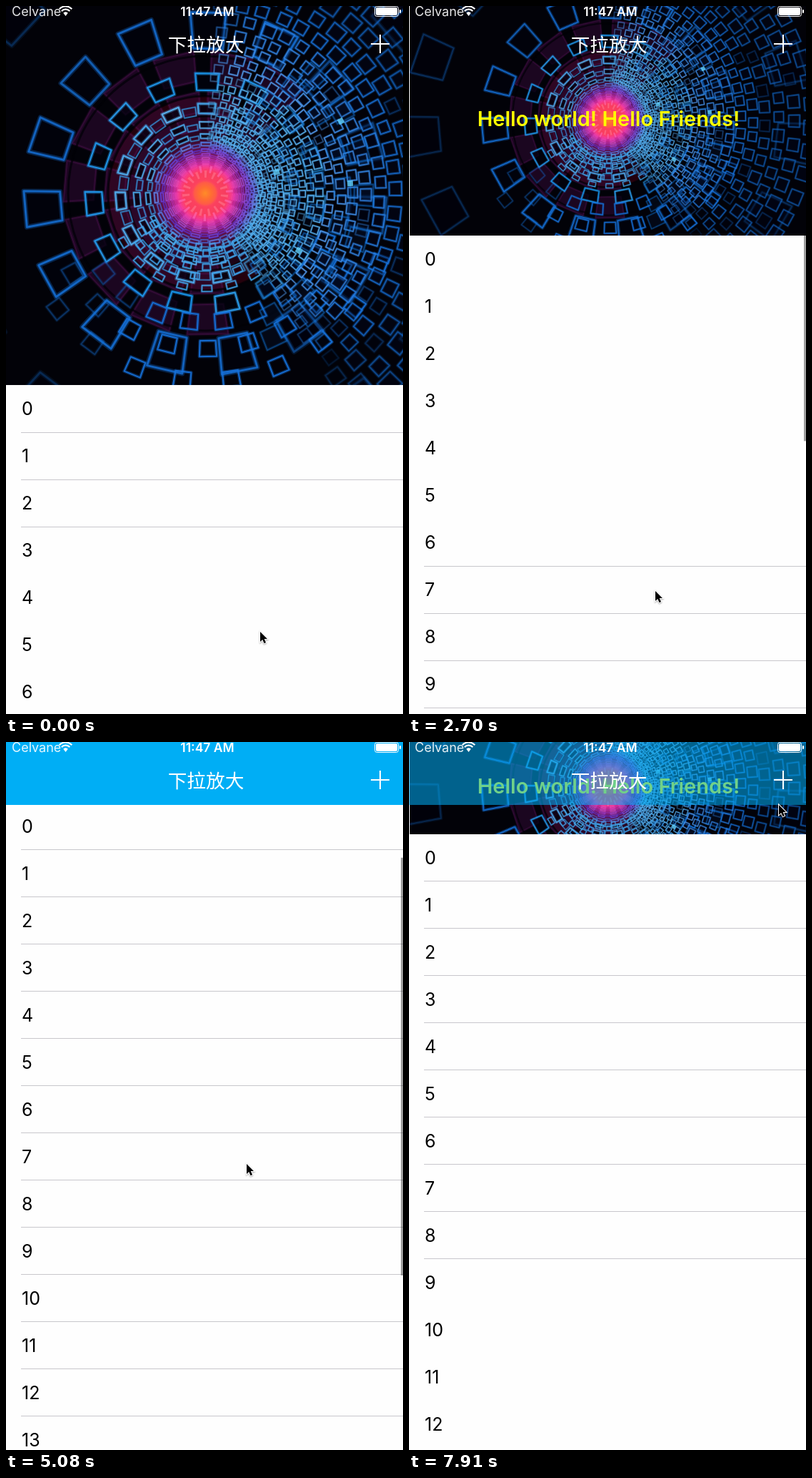
An HTML page with a canvas for the animation above (8 s loop, 556 px wide and 990 px high).

```html
<!DOCTYPE html>
<html lang="zh">
<head>
<meta charset="utf-8">
<style>
html, body { margin: 0; width: 100%; height: 100%; overflow: hidden; background: #fefefe; }
canvas { display: block; width: 556px; height: 990px; }
</style>
</head>
<body>
<canvas id="stage" width="556" height="990"></canvas>
<script>
const W = 556, H = 990, LOOP = 8000, ROW = 66, NAV = 88, REST = 366;
const ctx = document.getElementById('stage').getContext('2d');
const SANS = 'Inter, "Noto Sans", sans-serif';
const CJK = '"Noto Sans CJK SC", "Noto Sans CJK", "Noto Sans CJK JP", sans-serif';

// time, header height, pointer x, pointer y, first hidden separator
const KEYS = [
  [0, 530, 356, 875, 3], [150, 533, 355, 880, 3], [900, 533, 355, 880, 3],
  [1050, 500, 355, 881, 3], [1200, 410, 355, 881, -7], [1350, 374, 355, 881, -7],
  [1500, 366, 355, 881, -7], [1650, 366, 355, 881, -7], [1950, 366, 350, 868, -7],
  [2250, 366, 350, 863, -7], [2700, 321, 345, 818, -6], [3900, 117, 340, 615, 9],
  [4490, 92, 338, 596, 14], [5080, 85, 337, 590, 14], [6560, 145, 338, 642, -11],
  [7160, 129, 336, 626, 9], [7310, 129, 336, 626, 9], [7910, 129, 518, 88, 9]
];

const clamp = (v, a = 0, b = 1) => Math.min(b, Math.max(a, v));
const mix = (a, b, p) => a + (b - a) * p;

// The screen updates in uneven steps
const ticks = [0];
for (let n = 0; n < 53; n++) ticks.push(ticks[n] + ([29, 30, 34, 42].includes(n) ? 140 : 150));

function slope(i, c) {
  if (i < 1 || i >= KEYS.length - 1) return 0;
  const [p, k, n] = [KEYS[i - 1], KEYS[i], KEYS[i + 1]];
  const a = (k[c] - p[c]) / (k[0] - p[0]), b = (n[c] - k[c]) / (n[0] - k[0]);
  return a * b > 0 ? 2 * a * b / (a + b) : 0;
}

function track(t, c) {
  let i = 0;
  while (i < KEYS.length - 2 && t >= KEYS[i + 1][0]) i++;
  const a = KEYS[i], b = KEYS[i + 1], d = b[0] - a[0];
  const u = clamp((t - a[0]) / d), v = 1 - u;
  return a[c] * (1 + 2 * u) * v * v + slope(i, c) * d * u * v * v
       + b[c] * u * u * (3 - 2 * u) - slope(i + 1, c) * d * u * u * v;
}

function hidden(t) {
  let g = KEYS[0][4];
  for (const k of KEYS) if (t >= k[0]) g = k[4];
  return g;
}

// ---- tunnel picture, drawn once ----
const PW = 795, PH = 530, PX = 397, PY = 262;

function makeTunnel() {
  const cv = document.createElement('canvas');
  cv.width = PW; cv.height = PH;
  const g = cv.getContext('2d');
  let seed = 7;
  const rnd = () => (seed = (seed * 16807) % 2147483647) / 2147483647;
  const rad = d => d * Math.PI / 180;

  g.fillStyle = '#020208';
  g.fillRect(0, 0, PW, PH);
  g.translate(PX, PY);
  g.lineJoin = 'round';

  function disc(r, stops, from = 0, to = 360) {
    const gr = g.createRadialGradient(0, 0, 0, 0, 0, r);
    stops.forEach(([p, c]) => gr.addColorStop(p, c));
    g.fillStyle = gr;
    g.beginPath();
    g.moveTo(0, 0);
    g.arc(0, 0, r, rad(from), rad(to));
    g.fill();
  }

  function tile(deg, r, len, wid, style, lw, fill) {
    const a = r - len / 2, b = r + len / 2, p = wid / 2 * a / r, q = wid / 2 * b / r;
    g.save();
    g.rotate(rad(deg));
    g.beginPath();
    g.moveTo(a, -p); g.lineTo(b, -q); g.lineTo(b, q); g.lineTo(a, p);
    g.closePath();
    if (fill) { g.fillStyle = fill; g.fill(); }
    if (style) {
      const al = g.globalAlpha;
      g.strokeStyle = style;
      g.globalAlpha = al * .35;
      g.lineWidth = lw * 2.3;
      g.stroke();
      g.globalAlpha = al;
      g.lineWidth = lw;
      g.stroke();
    }
    g.restore();
  }

  const tint = (r, light) => {
    const near = clamp((74 - r) / 44);
    return `hsl(${mix(r < 170 ? 205 : 212, 320, near)},${mix(82, 90, near)}%,${light}%)`;
  };

  disc(136, [[0, 'rgba(220,30,70,.9)'], [.42, 'rgba(110,8,45,.65)'], [.7, 'rgba(45,2,28,.6)'], [1, 'rgba(52,0,14,.7)']], 55, 290);
  disc(115, [[0, 'rgba(200,30,90,.8)'], [.5, 'rgba(70,15,80,.5)'], [1, 'rgba(5,10,40,0)']]);

  // violet panes
  for (let k = 0; k < 15; k++) {
    const d = 175 + 24 * k, left = Math.cos(rad(d)) < .45;
    if (!left) continue;
    for (const [r, len, w] of [[176, 42, 52], [126, 28, 42], [98, 20, 30]])
      tile(d + 10, r, len, w, 'rgba(110,25,110,.28)', 2, 'rgba(62,14,66,.42)');
  }

  // dim arcs between rings
  g.lineWidth = 3;
  for (const r of [108, 136, 192]) {
    g.strokeStyle = 'rgba(0,0,6,.7)';
    g.beginPath(); g.arc(0, 0, r, 0, 7); g.stroke();
  }

  // main spokes
  const radii = [372];
  for (let n = 0; n < 14; n++) radii.push(494 / (2.17 + n));
  radii.forEach((r, n) => {
    const len = n ? .48 * r / (1.17 + n) : 66;
    for (let k = 0; k < 15; k++) {
      const d = 175 + 24 * k, c = Math.cos(rad(d));
      g.globalAlpha = n === 0 ? .5 : c > .5 && r > 90 ? .55 : .95;
      const light = n === 0 ? 27 : n === 1 ? 39 : n === 2 ? 50 : 60;
      tile(d, r, len, r * .2, tint(r, light + rnd() * 5), n < 2 ? 3 : n < 4 ? 2.2 : 1.5,
        n < 6 ? 'rgba(1,2,14,.75)' : null);
      if (r < 120) {
        g.globalAlpha = .75;
        tile(d + 12, r * .97, len * .9, r * .15, tint(r, 57), 1.3);
      }
    }
  });

  // lower half
  const low = [262, 217, 180, 133, 116, 103, 92, 83, 75];
  low.forEach((r, n) => {
    for (let d = 22 + (n % 2) * 7; d < 150; d += 15) {
      g.globalAlpha = d > 122 && r > 150 ? .35 : .9;
      tile(d, r, r > 150 ? 22 : 8.5, r > 150 ? 23 : r * .105, tint(r, r > 150 ? 47 : 59), r > 150 ? 2.1 : 1.5);
    }
  });

  // fine swarm on the right
  let ring = 0;
  for (let r = 58; r < 420; r *= 1.088, ring++) {
    const shift = (ring % 3) * 1.7;
    for (let d = -86 + shift; d < 56; d += 6.5) {
      const edge = clamp((d + 92) / 14) * clamp((62 - d) / 20);
      const far = clamp((r - 165) / 150);
      g.globalAlpha = edge * mix(.95, .62, far) * (rnd() < .1 ? .45 : 1);
      const size = r * .062 * (.88 + rnd() * .24);
      tile(d + rnd() * 1.2, r + rnd() * 3, size, size * 1.08, tint(r, mix(64, 44, far)),
        mix(1.3, 2.1, far), 'rgba(2,8,32,.55)');
    }
  }
  // overlapping frames inside the swarm
  for (const r of [125, 158, 192, 222])
    for (let d = -72; d < 45; d += 16) {
      g.globalAlpha = .4;
      tile(d + r / 9, r, r * .12, r * .13, 'hsl(210,85%,50%)', 1.8, 'rgba(8,50,120,.3)');
    }
  // a few glints
  for (const [x, y] of [[190, -101], [131, 80], [100, -30], [203, -14]]) {
    g.globalAlpha = .8;
    const d = Math.atan2(y, x) * 180 / Math.PI;
    tile(d, Math.hypot(x, y), 8, 8, null, 0, '#62d2ff');
  }
  g.globalAlpha = 1;

  // glowing core
  disc(78, [[0, 'rgba(255,75,90,1)'], [.4, 'rgba(255,62,98,.95)'], [.53, 'rgba(240,50,115,.5)'], [1, 'rgba(170,30,130,0)']]);
  for (let k = 0; k < 30; k++) {
    const r = 27 + (k % 2) * 7;
    tile(7 + 12 * k, r, 10, 3.2, null, 0, k % 2 ? 'rgba(255,120,200,.5)' : 'rgba(255,130,150,.5)');
  }
  disc(19, [[0, '#ff8c28'], [.45, 'rgba(255,112,48,.95)'], [.8, 'rgba(255,96,66,.85)'], [1, 'rgba(255,80,90,0)']]);
  return cv;
}
const tunnel = makeTunnel();

// ---- screen parts ----
function text(s, x, y, font, color, align = 'left') {
  ctx.font = font;
  ctx.fillStyle = color;
  ctx.textAlign = align;
  ctx.fillText(s, x, y);
}

function list(h, gap) {
  ctx.fillStyle = '#fefefe';
  ctx.fillRect(0, 0, W, H);
  for (let i = 0; h + i * ROW < H; i++) {
    const y = h + i * ROW;
    text(i, 22, y + 42, `25px ${SANS}`, '#000');
    if (i >= gap && i < gap + 12) continue;
    ctx.fillStyle = '#c8c7cc';
    ctx.fillRect(21, y + ROW - (h < 300 ? 1 : 0), W, 1);
  }
}

function scrollBar(t, h) {
  const off = t < 2400 ? clamp((1950 - t) / 450) : clamp((7760 - t) / 450);
  const bottom = 795.3 - .5825 * h;
  ctx.fillStyle = `rgba(0,0,0,${.38 * off})`;
  ctx.fillRect(553, bottom - 584, 3, 584);
}

function header(h) {
  const k = Math.max(h / PH, W / PW);
  ctx.save();
  ctx.beginPath();
  ctx.rect(0, 0, W, h);
  ctx.clip();
  ctx.drawImage(tunnel, W / 2 + 1 - PX * k, h / 2 - PH / 2 * k, PW * k, PH * k);
  ctx.globalAlpha = clamp(1 - (h - REST) / 100);
  text('Hello world! Hello Friends!', 279.5, h / 2 + 7, `600 29px ${SANS}`, '#ff0', 'center');
  ctx.restore();
}

function navBar(h) {
  ctx.fillStyle = `rgba(0,174,245,${clamp((185 - h) / 100)})`;
  ctx.fillRect(0, 0, W, NAV);
  text('下拉放大', 280, 64, `500 26.7px ${CJK}`, '#fff', 'center');
  ctx.fillRect(511, 52, 26, 2);
  ctx.fillRect(523, 40, 2, 26);

  text('Celvane', 8, 14, `18px ${SANS}`, 'rgba(255,255,255,.9)');
  text('11:47 AM', 282, 14, `600 17.5px ${SANS}`, '#fff', 'center');

  ctx.strokeStyle = '#fff';
  ctx.lineWidth = 2.2;
  for (const r of [12, 7.8]) {
    ctx.beginPath();
    ctx.arc(83.5, 12.5, r, -Math.PI * .76, -Math.PI * .24);
    ctx.stroke();
  }
  ctx.beginPath();
  ctx.moveTo(83.5, 14);
  ctx.arc(83.5, 12.5, 4.2, -Math.PI * .78, -Math.PI * .22);
  ctx.fill();

  ctx.lineWidth = 1;
  ctx.beginPath();
  ctx.roundRect(516.5, .5, 33, 14, 3);
  ctx.stroke();
  ctx.beginPath();
  ctx.roundRect(518, 2, 30, 11, 2);
  ctx.roundRect(551, 5, 2, 5, 1);
  ctx.fill();
}

function pointer(x, y) {
  const pts = [[0, 0], [0, 14], [3.2, 11], [5.6, 16.2], [8, 15.1], [5.7, 10], [10, 10]];
  ctx.save();
  ctx.translate(x, y);
  ctx.beginPath();
  pts.forEach(p => ctx.lineTo(...p));
  ctx.closePath();
  ctx.shadowColor = 'rgba(0,0,0,.35)';
  ctx.shadowBlur = 2;
  ctx.shadowOffsetY = 1;
  ctx.strokeStyle = '#fff';
  ctx.lineWidth = 2;
  ctx.stroke();
  ctx.shadowColor = 'transparent';
  ctx.fillStyle = '#000';
  ctx.fill();
  ctx.restore();
}

function draw(now) {
  const ms = now % LOOP;
  let t = 0;
  for (const k of ticks) if (k <= ms) t = k;
  const h = Math.round(track(t, 1));
  list(h, hidden(t));
  scrollBar(t, h);
  header(h);
  navBar(h);
  pointer(Math.round(track(t, 2)), Math.round(track(t, 3)));
}

const start = performance.now();
function loop() {
  draw(performance.now() - start);
  requestAnimationFrame(loop);
}
loop();
</script>
</body>
</html>
```
